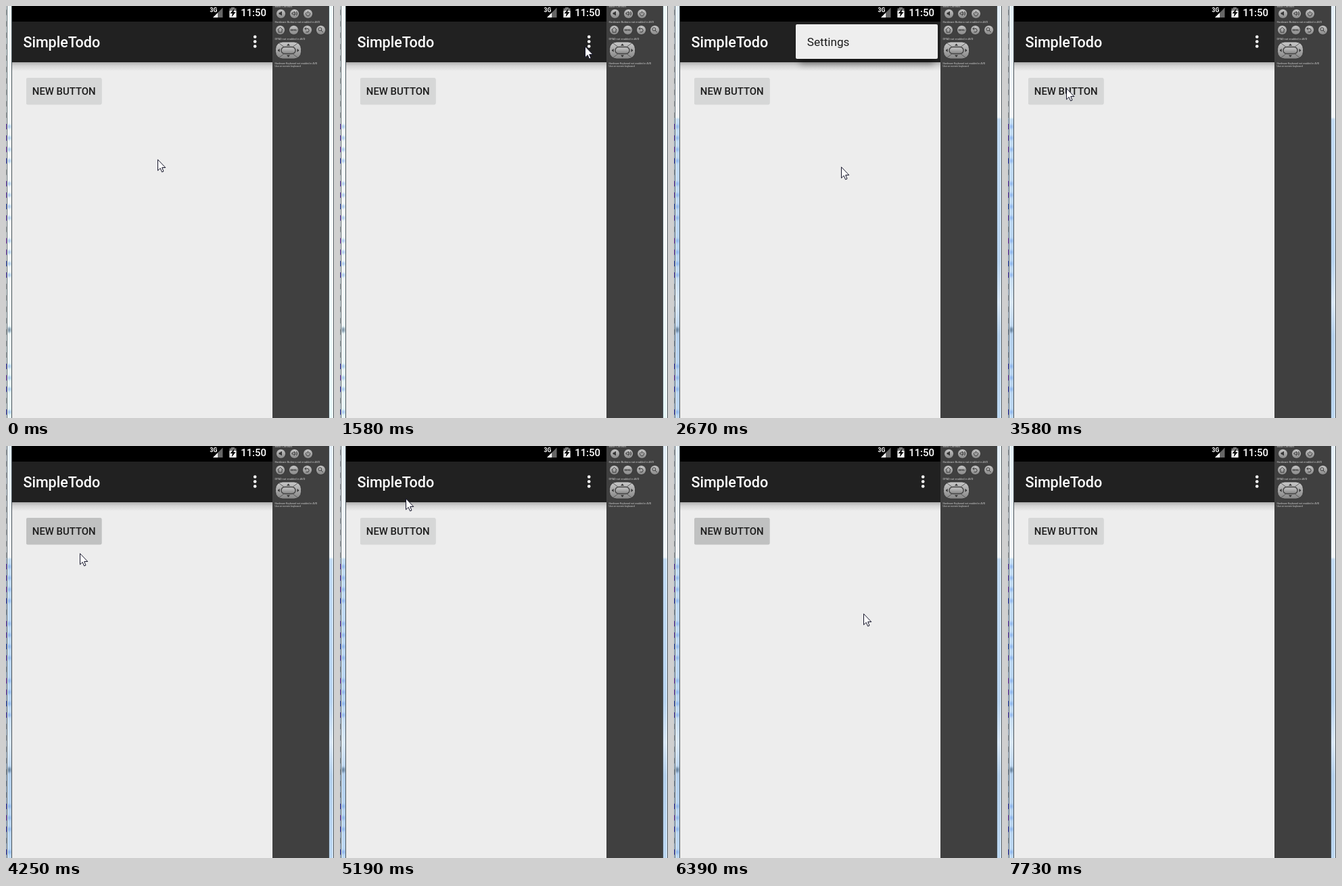
Write an HTML page that moves like this. It is 485 px wide and 608 px high and loops after 9000 ms.

```html
<!DOCTYPE html>
<html lang="en">
<head>
<meta charset="utf-8">
<title>SimpleTodo</title>
<style>
html, body { margin: 0; width: 100%; height: 100%; overflow: hidden; background: #ededed; }
svg { display: block; width: 485px; height: 608px; }
text { font-family: Roboto, "Open Sans", sans-serif; }
.medium { font-weight: 500; }
.tiny { font: 4px "Liberation Sans", Arial, sans-serif; fill: #cfcfcf; }
</style>
</head>
<body>
<svg viewBox="0 0 485 608">
  <defs>
    <linearGradient id="idle" x2="0" y2="1">
      <stop offset="0" stop-color="#eefbfc"/>
      <stop offset=".5" stop-color="#f7fdfe"/>
      <stop offset="1" stop-color="#e6f8fa"/>
    </linearGradient>
    <linearGradient id="glass" x2="0" y2="1">
      <stop offset="0" stop-color="#e3eef8"/>
      <stop offset=".27" stop-color="#f2f7fc"/>
      <stop offset=".275" stop-color="#c3dcf4"/>
      <stop offset=".62" stop-color="#b9d5f1"/>
      <stop offset=".72" stop-color="#dbe9f7"/>
      <stop offset=".8" stop-color="#b4d0ec"/>
      <stop offset="1" stop-color="#bdd8f2"/>
    </linearGradient>
    <linearGradient id="fall" x2="0" y2="1">
      <stop offset="0" stop-opacity=".26"/>
      <stop offset=".4" stop-opacity=".1"/>
      <stop offset="1" stop-opacity="0"/>
    </linearGradient>
    <linearGradient id="metal" x2="0" y2="1">
      <stop offset="0" stop-color="#c8c8c8"/>
      <stop offset="1" stop-color="#858585"/>
    </linearGradient>
    <filter id="soft" x="-100%" y="-100%" width="300%" height="300%"><feGaussianBlur stdDeviation="1.8"/></filter>
    <filter id="drop" x="-10%" y="-40%" width="120%" height="200%"><feGaussianBlur stdDeviation="5"/></filter>
    <clipPath id="phone"><rect x="9" y="23" width="385" height="585"/></clipPath>
    <clipPath id="edge"><rect width="8" height="608"/></clipPath>
  </defs>

  <!-- window borders -->
  <rect width="485" height="608" fill="url(#idle)"/>
  <rect id="active" width="485" height="608" fill="url(#glass)"/>
  <g id="marks" clip-path="url(#edge)">
    <ellipse cx="4.5" cy="478" rx="3" ry="4" fill="#30506c" opacity=".6" filter="url(#soft)"/>
  </g>
  <path d="M1.5 0V608M8.5 0V608M477.5 0V608M484.5 0V608" stroke="#4b5358"/>
  <path d="M2.5 0V608M483.5 0V608" stroke="#fff" stroke-opacity=".6"/>

  <!-- phone screen -->
  <rect x="9" y="23" width="385" height="585" fill="#ededed"/>
  <rect x="9" y="83" width="385" height="13" fill="url(#fall)"/>
  <rect x="9" width="385" height="23"/>
  <rect x="9" y="23" width="385" height="60" fill="#212121"/>
  <text class="medium" x="25.4" y="61" font-size="21.5" fill="#fff">SimpleTodo</text>
  <g fill="#fff">
    <circle cx="368.2" cy="45.5" r="2.3"/>
    <circle cx="368.2" cy="52.5" r="2.3"/>
    <circle cx="368.2" cy="59.5" r="2.3"/>
    <text class="medium" x="347.2" y="15.2" font-size="14.9">11:50</text>
    <path d="M306 17H313.5V9.5Z"/>
    <path d="M320.5 2.5V17H313.5V9.5Z" fill="#666"/>
    <text x="301.5" y="9" font-size="8.6" font-weight="700">3G</text>
    <path d="M333 2H338V3.6H340.5V17H330.5V3.6H333Z" fill="#777"/>
    <path d="M330.5 7H340.5V17H330.5Z"/>
    <path d="M337.5 4L331.5 11H334.8L333.6 16.5L339.6 9H336.4Z" fill="#000"/>
  </g>
  <rect x="30" y="107" width="111.5" height="38.6" rx="2" opacity=".12"/>
  <rect x="30" y="106" width="111.5" height="39" rx="2" fill="#d6d7d7"/>
  <rect id="press" x="30" y="106" width="111.5" height="39.5" rx="2"/>
  <text class="medium" x="85.7" y="131" font-size="14.9" text-anchor="middle" fill="#1c1c1c">NEW BUTTON</text>

  <g id="menu" clip-path="url(#phone)">
    <rect x="186" y="36" width="198" height="51" opacity=".3" filter="url(#drop)"/>
    <rect x="180" y="27" width="210" height="51" rx="2" fill="#eee"/>
    <text x="196.7" y="59" font-size="17.2" fill="#1c1c1c">Settings</text>
  </g>

  <!-- emulator controls -->
  <rect x="394" width="83" height="608" fill="#404040"/>
  <g class="tiny">
    <text x="397.5" y="2">Basic Controls</text>
    <text x="397.5" y="25.4">Hardware Buttons not enabled in AVD</text>
    <text x="397.5" y="49.6">DPAD not enabled in AVD</text>
    <g font-size="3.6">
      <text x="397.5" y="86">Hardware Keyboard not enabled in AVD</text>
      <text x="397.5" y="90">Use on-screen keyboard</text>
    </g>
  </g>
  <g id="keys" fill="url(#metal)" stroke="#2b2b2b" stroke-width=".8"></g>
  <g fill="none" stroke="#333" stroke-width=".9">
    <path d="M404 10H405.5L407.5 8V14L405.5 12H404Z" fill="#333"/>
    <path d="M423 10H424.5L426.5 8V14L424.5 12H423ZM428 9Q429.6 11 428 13M429.6 8Q432 11 429.6 14"/>
    <path d="M444.6 9.2A3 3 0 1 0 448.4 9.2M446.5 7.5V11"/>
    <path d="M401.5 35.5L405.5 31.5L409.5 35.5M403 35V38.8H408V35"/>
    <path d="M442 33.5H447Q449.5 36 447 38.3H443.5M444 31.3L441.8 33.5L444 35.6"/>
    <circle cx="464.3" cy="34.2" r="2.4"/>
    <path d="M466 36L468.7 38.8"/>
  </g>
  <text x="425.5" y="36.8" font-size="3.6" font-weight="700" text-anchor="middle" fill="#333">MENU</text>
  <rect x="398.5" y="53" width="38" height="25" rx="10.5" fill="url(#metal)" stroke="#2b2b2b" stroke-width=".8"/>
  <path d="M404 55L431 76M431 55L404 76" stroke="#555" stroke-width=".9"/>
  <rect x="407" y="60.5" width="21" height="10" rx="5" fill="url(#metal)" stroke="#444" stroke-width="1.4"/>
  <path d="M415 58.6L417.5 55.5L420 58.6ZM415 72.6L417.5 75.6L420 72.6ZM404.6 63L401.6 65.5L404.6 68ZM430.5 63L433.5 65.5L430.5 68Z" fill="#333"/>

  <path id="cursor" d="M.5 .7V16.9L4.2 13.4L6.6 19L9 18L6.7 12.5H11.8Z" fill="#fff" stroke="#15152a" stroke-linejoin="round"/>
</svg>
<script>
const LOOP = 9000, STEP = 130;
const $ = id => document.getElementById(id);

function add(parent, tag, attrs) {
  const el = document.createElementNS("http://www.w3.org/2000/svg", tag);
  for (const key in attrs) el.setAttribute(key, attrs[key]);
  $(parent).appendChild(el);
}

let seed = 7;
const random = () => (seed = seed * 16807 % 2147483647) / 2147483647;

// Lines of page text behind the left border, in groups of four
for (let k = -10; k < 26; k++) {
  const y = 178 + 16.85 * k;
  const fill = `hsl(${225 + 60 * random()} 75% 42%)`;
  const lit = k >= 0 && k % 5 !== 4 && (k < 14 || k > 20);
  add("marks", "rect", { x: 0, y: y - 4, width: 1.5, height: 8, fill: lit ? fill : "#555", opacity: lit ? .75 : .4 });
  if (lit) add("marks", "ellipse", { cx: 4.5, cy: y, rx: 3, ry: 3, fill: "#5f94e8", opacity: .5, filter: "url(#soft)" });
}

function keyRow(count, x, y) {
  for (let i = 0; i < count; i++) add("keys", "circle", { cx: x + 20 * i, cy: y, r: 7 });
}
keyRow(3, 406.5, 11.5);
keyRow(4, 405.5, 35.5);

// Pointer path: each move starts where the last one ended
const home = [224, 226];
const moves = [
  { from: 460, to: 1030, end: [350, 66], bend: [42, 150] },
  { from: 1310, to: 1570, end: [362, 59] },
  { from: 2130, to: 2670, end: [247, 237] },
  { from: 2950, to: 3580, end: [86, 121] },
  { from: 3980, to: 4790, end: [144, 215] },
  { from: 5070, to: 5190, end: [97, 77] },
  { from: 5320, to: 5970, end: [87, 121] },
  { from: 6120, to: 6390, end: [280, 247] },
  { from: 6525, to: 6930, end: [335, 484] },
  { from: 7180, to: 7730, end: [410, 640] }
];

const ease = u => u * u * (3 - 2 * u);

// Progress from 0 to 1 in equal jumps, the first at the start of the move
function progress(t, { from, to }) {
  const gaps = Math.round((to - from) / STEP);
  const k = Math.floor((t - from) / (to - from) * gaps + .05);
  return Math.min(1, (k + 1) / (gaps + 1));
}

function pointer(t) {
  let pos = home;
  for (const move of moves) {
    if (t < move.from) break;
    const u = ease(progress(t, move)), { end } = move;
    const bend = move.bend || pos.map((p, i) => (p + end[i]) / 2);
    pos = pos.map((p, i) => Math.round((1 - u) ** 2 * p + 2 * u * (1 - u) * bend[i] + u * u * end[i]));
  }
  return pos;
}

// Half strength on the first step, full from the second
const ramp = (t, at) => t < at ? 0 : Math.min(1, .5 + .5 * Math.floor((t - at) / STEP));
const pulse = (t, on, off) => ramp(t, on) - ramp(t, off);

function draw(now) {
  const t = now % LOOP;
  $("cursor").setAttribute("transform", `translate(${pointer(t)})`);
  $("active").style.opacity = t >= 1700 ? 1 : 0;
  $("menu").style.opacity = pulse(t, 2130, 2950);
  $("press").style.opacity = .1 * (pulse(t, 3980, 4380) + pulse(t, 6120, 6520));
}

const start = performance.now();
function tick() {
  draw(performance.now() - start);
  requestAnimationFrame(tick);
}
tick();
</script>
</body>
</html>
```
